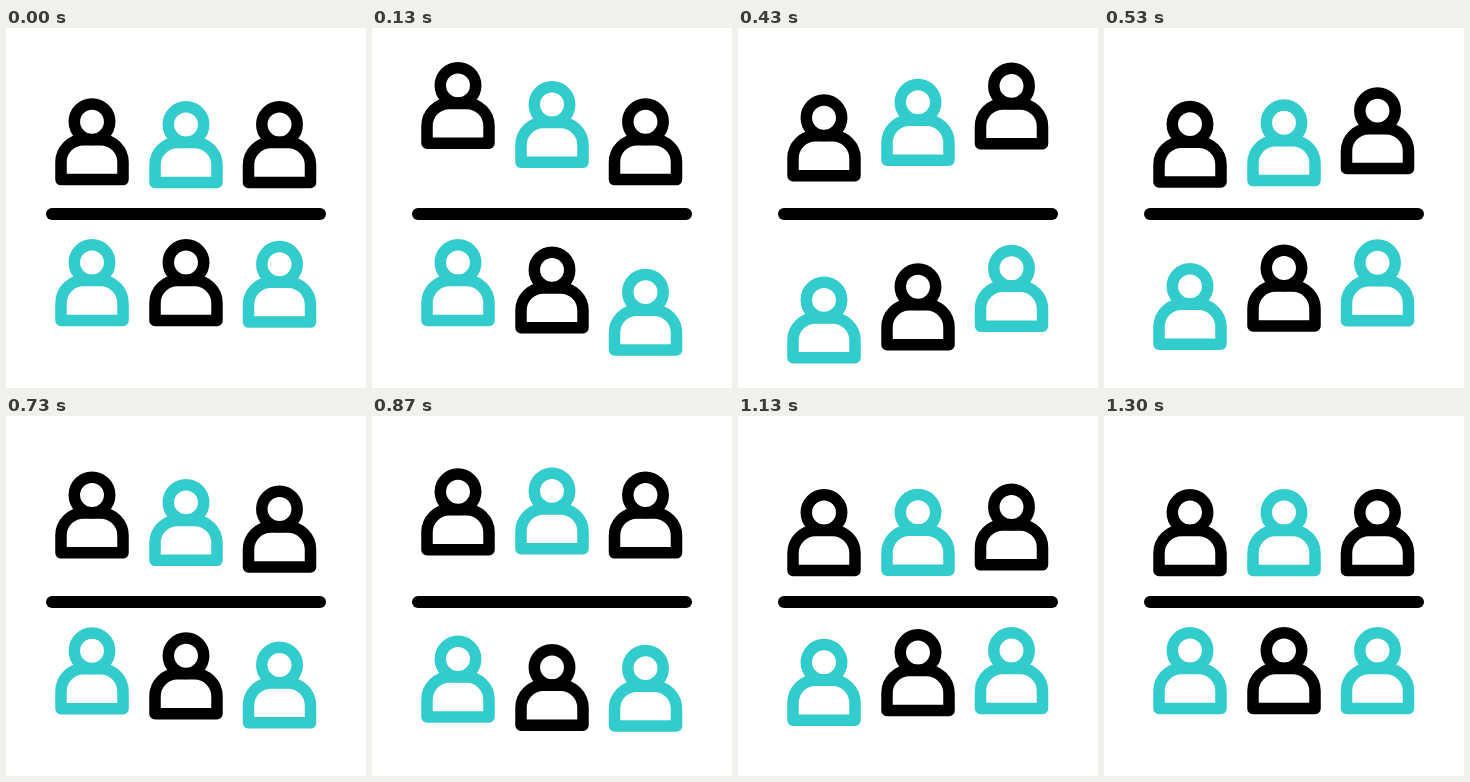
Write an HTML page that moves like this. It is 360 px wide and 360 px high and loops after 1.67 s.

```html
<!DOCTYPE html>
<html lang="en">
<head>
<meta charset="utf-8">
<title>Bouncing teams</title>
<style>
  html, body { margin: 0; width: 100%; height: 100%; overflow: hidden; background: #fff; }
  svg { display: block; width: 100vw; height: 100vh; }
</style>
</head>
<body>
<svg viewBox="0 0 360 360" fill="none" stroke-width="11.5" stroke-linejoin="round" stroke-linecap="round">
  <defs>
    <g id="person">
      <circle cy="96.5" r="17.7"/>
      <path d="M-31 154.4V137A22.5 22.5 0 0 1 -8.5 114.5H8.5A22.5 22.5 0 0 1 31 137V154.4Z"/>
    </g>
  </defs>
  <path d="M46 186H314" stroke="#000" stroke-width="12"/>
</svg>
<script>
const LOOP = 1670, STEP = 100 / 3;
const BLACK = '#000', TEAL = '#33cccc';
const svg = document.querySelector('svg');

// Cubic bezier easing through (x1, 0) and (x2, 1)
const bezier = (x1, x2) => x => {
  let lo = 0, hi = 1;
  for (let i = 0; i < 20; i++) {
    const u = (lo + hi) / 2, v = 1 - u;
    if (3 * x1 * u * v * v + 3 * x2 * u * u * v + u ** 3 < x) lo = u;
    else hi = u;
  }
  return lo * lo * (3 - 2 * lo);
};
const launch = bezier(.33, .55), rebound = bezier(.48, .6), fall = bezier(1 / 3, 2 / 3);

// Two bounces; t is measured from the first peak
function bounce(t, first, second) {
  if (t <= -253 || t >= 865) return 0;
  if (t < 0) return first * launch((t + 253) / 253);
  if (t < 281) return first * (1 - fall(t / 281));
  if (t < 612) return second * rebound((t - 281) / 331);
  return second * (1 - fall((t - 612) / 253));
}

const people = [];
[86, 180, 273.5].forEach((x, i) => {
  const odd = i % 2;
  people.push(
    { x, y: 0, peak: 218 + 66.7 * i, first: -48.6, second: -22, color: odd ? TEAL : BLACK },
    { x, y: 138, peak: 418 - 98 * i, first: 37.7, second: 18.5, color: odd ? BLACK : TEAL }
  );
});
for (const p of people) {
  p.el = document.createElementNS(svg.namespaceURI, 'use');
  p.el.setAttribute('href', '#person');
  p.el.setAttribute('stroke', p.color);
  svg.append(p.el);
}

function draw(now) {
  // The motion advances at 30 steps per second
  const t = Math.floor((now % LOOP + 4) / STEP) * STEP;
  for (const p of people) {
    const y = p.y + bounce(t - p.peak, p.first, p.second);
    p.el.setAttribute('transform', `translate(${p.x} ${y})`);
  }
}

let start;
function tick(now) {
  start ??= now;
  draw(now - start);
  requestAnimationFrame(tick);
}
draw(0);
requestAnimationFrame(tick);
</script>
</body>
</html>
```
